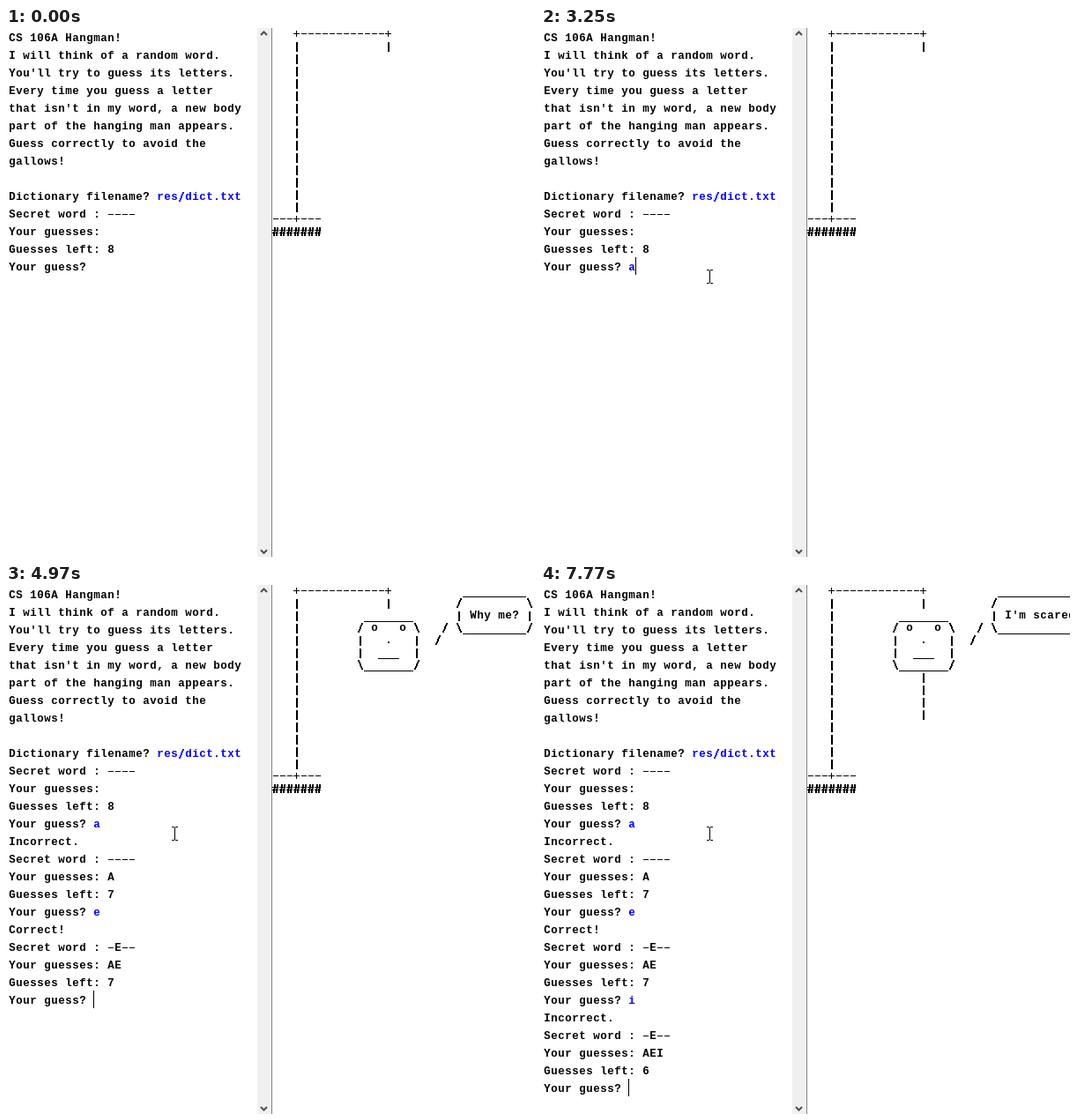
Write an HTML page with a canvas that moves like this. It is 600 px wide and 600 px high and loops after 8 s.

```html
<!DOCTYPE html>
<html lang="en">
<head>
<meta charset="utf-8">
<title>Hangman</title>
<style>
html, body { margin: 0; width: 100%; height: 100%; overflow: hidden; background: #fff; }
canvas { display: block; }
</style>
</head>
<body>
<canvas id="stage" width="600" height="600"></canvas>
<script>
const ctx = document.getElementById('stage').getContext('2d');
const LOOP = 8000, CELL = 8;

const intro = [
  'CS 106A Hangman!', 'I will think of a random word.', "You'll try to guess its letters.",
  'Every time you guess a letter', "that isn't in my word, a new body", 'part of the hanging man appears.',
  'Guess correctly to avoid the', 'gallows!', '', 'Dictionary filename? '
];
// Each round: when it is printed, its result lines, and the next letter with its typing time
const rounds = [
  { at: 0, word: '----', used: '', left: 8, key: 'a', typed: 3250 },
  { at: 3490, result: 'Incorrect.', word: '----', used: 'A', left: 7, key: 'e', typed: 4650 },
  { at: 4970, result: 'Correct!', word: '-E--', used: 'AE', left: 7, key: 'i', typed: 6610 },
  { at: 6770, result: 'Incorrect.', word: '-E--', used: 'AEI', left: 6, key: '', typed: LOOP }
];
const caretOn = [[2770, 3950], [4490, 5510], [5990, 6450], [6610, 7230], [7770, LOOP]];
const pointer = [
  [200, 340, 433], [280, 300, 343], [520, 235, 309], [600, 207, 292], [680, 198, 287],
  [2850, 196, 286], [2930, 193, 283], [3010, 191, 282]
];

// Steep two-pixel stroke without smoothing; dir is 1 for a backslash, -1 for a slash
function slant(x, top, height, run, dir) {
  for (let i = 0; i < height; i++) {
    const step = Math.round(i * run / (height - 1));
    ctx.fillRect(x + (dir > 0 ? step : run - step), top + i, 2, 1);
  }
}

// Monospaced text; line-like characters are drawn as crisp strokes
function print(text, x, base, color = '#000') {
  ctx.fillStyle = color;
  for (const ch of text) {
    if (ch === '|') ctx.fillRect(x + 3, base - 8, 2, 11);
    else if (ch === '_') ctx.fillRect(x, base + 3, CELL, 1);
    else if (ch === '-') ctx.fillRect(x + 1, base - 4, 6, 1);
    else if (ch === '+') {
      ctx.fillRect(x, base - 4, 7, 1);
      ctx.fillRect(x + 3, base - 7, 1, 7);
    }
    else if (ch === '#') {
      slant(x + 1, base - 8, 10, 1, -1);
      slant(x + 4, base - 8, 10, 1, -1);
      ctx.fillRect(x, base - 5, 7, 1);
      ctx.fillRect(x, base - 2, 7, 1);
    }
    else if (ch === '/') slant(x + 1, base - 9, 11, 4, -1);
    else if (ch === '\\') slant(x + 1, base - 9, 11, 4, 1);
    else ctx.fillText(ch, x + CELL / 2, base);
    x += CELL;
  }
}

function drawConsole(t) {
  let row = 0;
  const println = (text, input = '') => {
    const base = 15 + 20 * row++;
    print(text, 3, base);
    print(input, 3 + CELL * text.length, base, '#00f');
  };
  intro.forEach((text, i) => println(text, i === 9 ? 'res/dict.txt' : ''));
  let typed;
  for (const r of rounds.filter(r => t >= r.at)) {
    if (r.result) println(r.result);
    println('Secret word : ' + r.word);
    println('Your guesses: ' + r.used);
    println('Guesses left: ' + r.left);
    typed = t >= r.typed ? r.key : '';
    println('Your guess? ', typed);
  }
  if (caretOn.some(([from, to]) => t >= from && t < to)) {
    ctx.fillStyle = '#000';
    ctx.fillRect(99 + CELL * typed.length, 20 * (row - 1), 1, 20);
  }
}

function drawArt(t) {
  const art = (text, col, row) => print(text, 302 + CELL * col, 14 * row + 10);
  art('+------------+', 3, 0);
  art('|', 16, 1);
  for (let row = 1; row < 15; row++) art('|', 3, row);
  art('---+---', 0, 15);
  art('#######', 0, 16);
  if (t < 3490) return;

  [' _______', '/ o   o \\', '|   .   |', '|  ___  |', '\\_______/']
    .forEach((text, i) => art(text, 12, 2 + i));
  art('/', 24, 3);
  art('/', 23, 4);
  const speech = t < 6770 ? 'Why me?' : "I'm scared!";
  const width = speech.length + 2;
  art(' ' + '_'.repeat(width), 26, 0);
  art('/' + ' '.repeat(width) + '\\', 26, 1);
  art('| ' + speech + ' |', 26, 2);
  art('\\' + '_'.repeat(width) + '/', 26, 3);
  if (t >= 6770) for (let row = 7; row < 11; row++) art('|', 16, row);
}

function chevron(tip, dir) {
  ctx.strokeStyle = '#505050';
  ctx.lineWidth = 2;
  ctx.stroke(new Path2D(`M289 ${tip + 3.5 * dir}L292.5 ${tip}L296 ${tip + 3.5 * dir}`));
}

function drawScrollbar() {
  ctx.fillStyle = '#f0f0f0';
  ctx.fillRect(285, 0, 16, 600);
  ctx.fillStyle = '#828282';
  ctx.fillRect(301, 0, 1, 600);
  chevron(4.5, 1);
  chevron(595.5, -1);
}

function drawPointer(t) {
  const pose = pointer.filter(p => t >= p[0]).pop();
  if (!pose) return;
  const [, x, y] = pose;
  ctx.fillStyle = '#000';
  if (x < 285) {
    ctx.fillRect(x, y - 7, 1, 14);
    for (const edge of [y - 8, y + 7]) {
      ctx.fillRect(x - 3, edge, 3, 1);
      ctx.fillRect(x + 1, edge, 3, 1);
    }
    return;
  }
  const arrow = new Path2D(`M${x + .5} ${y + .5}v16l4-4 3 6 2-1-3-6h5z`);
  ctx.fillStyle = '#fff';
  ctx.fill(arrow);
  ctx.strokeStyle = '#000';
  ctx.lineWidth = 1;
  ctx.stroke(arrow);
}

function frame() {
  const t = performance.now() % LOOP;
  ctx.fillStyle = '#fff';
  ctx.fillRect(0, 0, 600, 600);
  ctx.font = 'bold 12.5px "Liberation Mono", "Courier New", monospace';
  ctx.textAlign = 'center';
  drawArt(t);
  drawScrollbar();
  drawConsole(t);
  drawPointer(t);
  requestAnimationFrame(frame);
}
frame();
</script>
</body>
</html>
```
